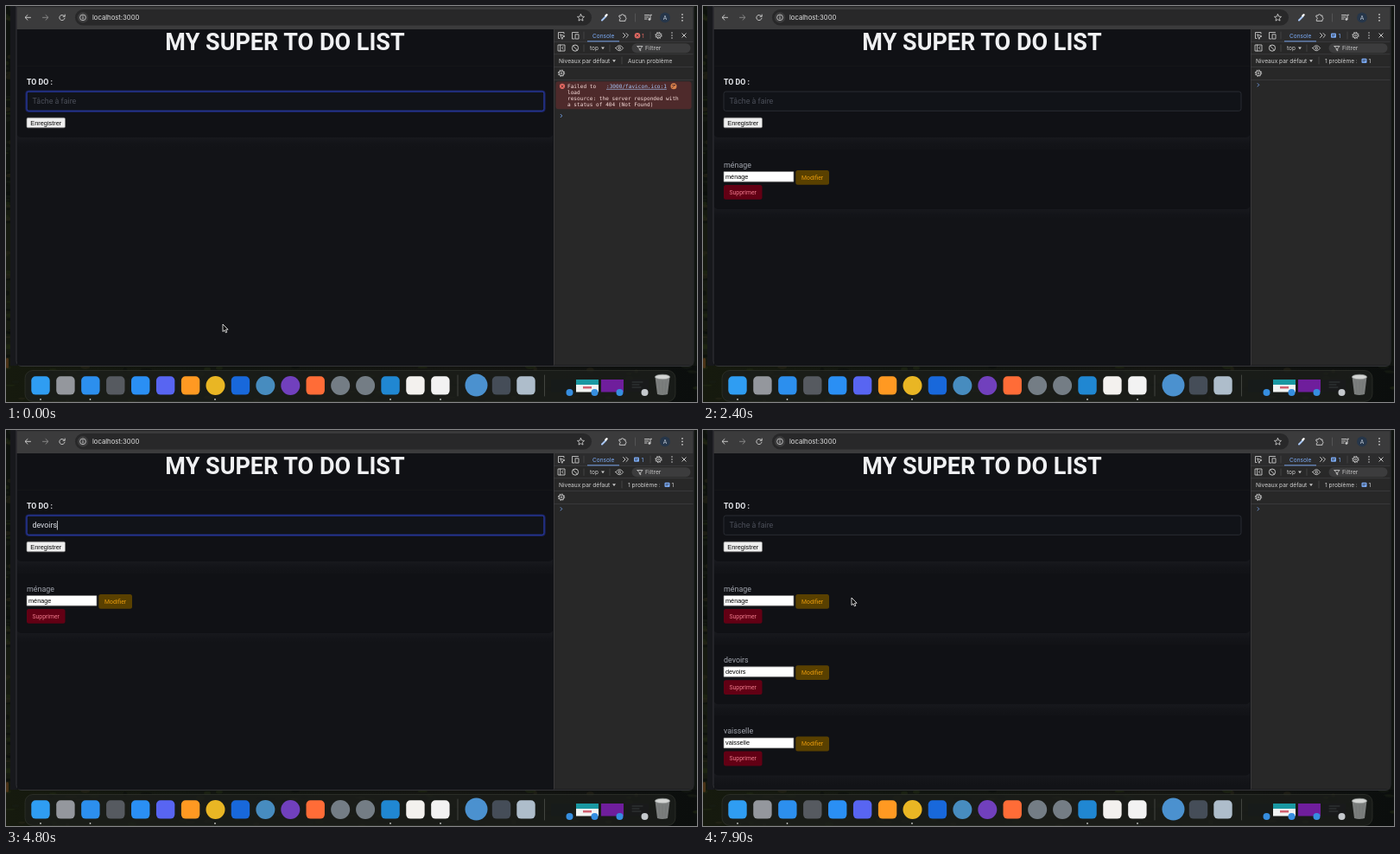
An HTML page that plays this animation: 800x458 px, repeating every 8 s.

```html
<!DOCTYPE html>
<html lang="fr">
<head>
<meta charset="utf-8">
<title>To do list</title>
<style>
html, body { margin: 0; width: 100%; height: 100%; overflow: hidden; background: #0c100c; }
svg { display: block; width: 100vw; height: 100vh; }
text { white-space: pre; }
.ui { font-family: Inter, sans-serif; }
.page { font-family: Roboto, sans-serif; }
.form { font-family: "Liberation Sans", Arial, sans-serif; }
.mono { font-family: "DejaVu Sans Mono", monospace; }
</style>
</head>
<body>
<svg id="stage" viewBox="0 0 800 458" preserveAspectRatio="none">
<defs>
  <linearGradient id="floor" x2="1" y2="0">
    <stop offset="0" stop-color="#161a0e"/><stop offset=".3" stop-color="#10140f"/>
    <stop offset=".65" stop-color="#141511"/><stop offset="1" stop-color="#0b0e0d"/>
  </linearGradient>
  <linearGradient id="glow" x2="0" y2="1">
    <stop offset="0" stop-color="#1d1e23"/><stop offset="1" stop-color="#121317" stop-opacity="0"/>
  </linearGradient>
  <clipPath id="view"><rect x="13" y="27" width="621" height="388.5"/></clipPath>
</defs>
<g id="desk"></g><g id="browser"></g><g id="tools"></g>
<g id="page" clip-path="url(#view)"></g>
<g id="menu"></g><g id="dock"></g>
<path id="pointer" d="M0 0V8.6L2 6.8L3.4 9.8L4.8 9.2L3.5 6.2H6.1Z" fill="#000" stroke="#fff" stroke-width=".8"/>
</svg>
<script>
const LOOP = 8000;
const $ = id => document.getElementById(id);
const rect = (x, y, w, h, fill, r = 0, extra = '') =>
  `<rect x="${x}" y="${y}" width="${w}" height="${h}" rx="${r}" fill="${fill}" ${extra}/>`;
const disc = (x, y, r, fill, extra = '') => `<circle cx="${x}" cy="${y}" r="${r}" fill="${fill}" ${extra}/>`;
const line = (d, color = '#c7c7c7', w = 1) =>
  `<path d="${d}" fill="none" stroke="${color}" stroke-width="${w}" stroke-linecap="round" stroke-linejoin="round"/>`;
const text = (x, y, size, fill, str, cls = 'ui', extra = '') =>
  `<text x="${x}" y="${y}" font-size="${size}" fill="${fill}" class="${cls}" ${extra}>${str}</text>`;
const ring = (x, y, r, color = '#c7c7c7', w = 1) => disc(x, y, r, 'none', `stroke="${color}" stroke-width="${w}"`);
const gear = (x, y) => ring(x, y, 2.9) + ring(x, y, 1, '#c7c7c7', .8) +
  `<circle cx="${x}" cy="${y}" r="3.7" fill="none" stroke="#c7c7c7" stroke-width="1" stroke-dasharray="1.4 1.5"/>`;
const caretDown = (x, y) => `<path d="M${x} ${y}h4l-2 2.6z" fill="#c7c7c7"/>`;

function seeded(seed) {
  return () => (seed = seed * 16807 % 2147483647) / 2147483647;
}

function drawDesk() {
  const rnd = seeded(41);
  const leaf = (x, y) => {
    const tone = ['#1f2813', '#0a0d0b', '#262417', '#171d14'][Math.floor(rnd() * 4)];
    return `<ellipse cx="${x}" cy="${y}" rx="${2 + rnd() * 5}" ry="${1 + rnd() * 2}" fill="${tone}" fill-opacity=".6"/>`;
  };
  const leaves = (n, place) => Array.from({ length: n }, () => leaf(...place())).join('');
  $('desk').innerHTML = rect(0, 0, 800, 458, '#0c100d') + rect(0, 410, 800, 48, 'url(#floor)') +
    rect(0, 0, 5, 230, '#0e120d') + rect(0, 230, 5, 180, '#161a10') +
    leaves(60, () => [rnd() * 5, rnd() * 420]) + leaves(120, () => [rnd() * 800, 416 + rnd() * 42]) +
    rect(0, 407, 3, 12, '#4a3216', 1.5) + rect(5, 0, 8, 416, '#17181c') +
    rect(795, 0, 5, 416, '#101410');
}

function drawBrowser() {
  $('browser').innerHTML =
    rect(12, -10, 784, 426.5, '#121317', 6, 'stroke="#434448" stroke-width=".7"') +
    rect(12.5, 0, 783, 27, '#3b3b3c') + rect(12.5, 0, 783, 1.2, '#242426') +
    rect(80, 4, 598, 18.5, '#282829', 9.2) +
    line('M28.5 13.3H22.5M25 10.5L22 13.3L25 16.2') +
    line('M42.5 13.3H48.5M46 10.5L49 13.3L46 16.2', '#858585') +
    line('M67.6 11.8A3.1 3.1 0 1 0 68 14.2M68.2 10V12.2H66') +
    disc(89, 13.3, 6.2, '#3b3b3c') + ring(89, 13.3, 3.4, '#d5d5d5', .8) +
    line('M89 12.9V15M89 11.5V11.6', '#d5d5d5', .9) +
    text(100, 16.1, 7.7, '#e3e3e3', 'localhost:3000') +
    line('M665.5 9.4L666.7 12.1L669.5 12.4L667.4 14.3L668 17.1L665.5 15.6L663 17.1L663.6 14.3L661.5 12.4L664.3 12.1Z', '#c7c7c7', .9) +
    line('M690 16.5L694.5 12', '#a8c7fa', 2) + line('M694.3 11.3L695.6 10.2', '#fff', 2.3) +
    line('M710.3 11H712.2A1.4 1.4 0 0 1 715 11H717V13.1A1.4 1.4 0 0 1 717 15.8V17.3H710.3V15.6A1.4 1.4 0 0 0 710.3 12.9Z') +
    line('M728.5 9V18', '#5b5b5c', .8) +
    line('M739.5 10.5H745M739.5 12.8H744M739.5 15H742M746 15.3V10.3H747.5') + disc(744.9, 15.4, 1.4, '#c7c7c7') +
    disc(763, 13.4, 5.9, '#26364a') + text(763, 15.8, 6.5, '#cfd8e3', 'A', 'ui', 'text-anchor="middle"') +
    [9.8, 13.3, 16.8].map(y => disc(783, y, .9, '#d0d0d0')).join('');
}

function drawTools() {
  const edge = y => rect(634, y, 161.5, .6, '#434446');
  const message = ['Failed to', 'load', 'resource: the server responded with', 'a status of 404 (Not Found)'];
  const blueBadge = (x, y) => rect(x, y, 6, 5.2, '#7cacf8', 1) +
    line(`M${x + 1.5} ${y + 1.7}h3m-3 1.6h2`, '#282828', .7);
  $('tools').innerHTML =
    rect(634, 27, 161.5, 388.5, '#282828') + rect(634, 27, 161.5, 14, '#2c2c2d') +
    rect(633.6, 27, .8, 388.5, '#515254') + edge(41) + edge(55.5) + edge(70) + edge(85) +
    line('M646 32V30.5H639.5V37.5H641M642 33L647 35L644.8 35.8L644 38Z', '#c7c7c7', .9) +
    line('M658 38H655.5V30.5H662.5M659.5 32.8H663V38H659.5Z', '#c7c7c7', .9) +
    line('M669 30V38', '#505050', .7) +
    text(679, 36.5, 6.5, '#7cacf8', 'Console') + rect(673, 40.4, 37, .9, '#7cacf8') +
    line('M714.5 31.5L717 34L714.5 36.5M718 31.5L720.5 34L718 36.5') +
    gear(755.5, 34) + [31, 34, 37].map(y => disc(771, y, .8, '#c7c7c7')).join('') +
    line('M782.8 31.8L787.2 36.2M787.2 31.8L782.8 36.2') + line('M746 30V38', '#505050', .7) +
    line('M639.5 45H647V52H639.5ZM641.7 45V52M645 47.2L643.5 48.5L645 49.8', '#c7c7c7', .9) +
    ring(659, 48.6, 3.6) + line('M656.6 46.2L661.4 51') + line('M669 45V52.5', '#505050', .7) +
    text(676, 51, 6.5, '#d0d0d0', 'top') + caretDown(689, 47.6) + line('M699 45V52.5', '#505050', .7) +
    line('M705.8 48.7Q710.2 42.4 714.6 48.7Q710.2 55 705.8 48.7Z', '#c7c7c7', .9) + ring(710.2, 48.7, 1.3) +
    rect(724.5, 43.2, 68, 11, '#3c3c3d', 5.5) +
    line('M731 46.5H737L734.7 49.2V51.8L733.3 50.8V49.2Z', '#c7c7c7', .9) +
    text(740, 51.1, 6.7, '#c7c7c7', 'Filtrer') +
    text(640, 65.7, 6.6, '#d0d0d0', 'Niveaux par défaut') + caretDown(702, 62.3) +
    line('M713 59V67', '#505050', .7) + gear(643, 77.7) +
    `<g id="failure">` +
      disc(731, 34.2, 3.3, '#e46962') + line('M729.8 33L732.2 35.4M732.2 33L729.8 35.4', '#303031', .8) +
      text(736, 36.6, 6.6, '#e46962', '1') + text(720, 65.7, 6.6, '#d0d0d0', 'Aucun problème') +
      rect(636.5, 87.3, 157, 32, '#4e2a2b', 3) +
      disc(644, 92.8, 3.1, '#e46962') + line('M642.9 91.7L645.1 93.9M645.1 91.7L642.9 93.9', '#4e2a2b', .8) +
      message.map((m, i) => text(650, 94.9 + i * 7.15, 6.12, '#f9dedc', m, 'mono')).join('') +
      text(695, 94.9, 6.12, '#a8c7fa', ':3000/favicon.ico:1', 'mono', 'text-decoration="underline"') +
      disc(773, 92.8, 3.5, '#d9824b') + line('M771 94.6L775 91M771.5 91.5H774.5', '#4e2a2b', .8) +
    `</g><g id="issue">` +
      blueBadge(727, 31.6) + text(735.5, 36.6, 6.6, '#7cacf8', '1') +
      text(720, 65.7, 6.6, '#d0d0d0', '1 problème :') + blueBadge(762.5, 60.8) +
      text(770.5, 65.7, 6.6, '#d0d0d0', '1') +
    `</g><path id="prompt" d="M641.8 -2L643.8 0L641.8 2" fill="none" stroke="#6b91cf"/>`;
}

function todo(name, i) {
  return `<g id="todo${i}" transform="translate(0 ${i * 82.3})">` +
    rect(13, 230, 620, 18, 'url(#glow)', 5) +
    `<path d="M13 166H633V230Q633 235 628 235H18Q13 235 13 230Z" fill="#101115"/>` +
    text(24, 186.6, 8.9, '#a0a4ad', name, 'page') +
    rect(24, 191.5, 81, 11.8, '#fff', .5, 'stroke="#777" stroke-width=".7"') +
    text(26, 199.9, 7.3, '#000', name, 'form') +
    rect(107.3, 190, 38.7, 16.8, '#594000', 2.5) + text(126.6, 200.8, 6.8, '#eb9c0c', 'Modifier', 'page', 'text-anchor="middle"') +
    rect(24, 207, 44.5, 16.8, '#620014', 2.5) + text(46.2, 217.6, 6.8, '#f17b8d', 'Supprimer', 'page', 'text-anchor="middle"') +
    `</g>`;
}

function drawPage() {
  $('page').innerHTML =
    rect(13, 27, 621, 389, '#121317') + rect(13, 147, 620, 19, 'url(#glow)', 5) +
    `<path d="M13 27H633V147Q633 152 628 152H18Q13 152 13 147Z" fill="#101115"/>` +
    rect(13, 69, 620, .7, '#16171b') +
    text(323, 50.7, 27, '#f0f1f3', 'MY SUPER TO DO LIST', 'page', 'text-anchor="middle" font-weight="700"') +
    text(24, 90.8, 8.8, '#e6e8ec', 'TO DO :', 'page', 'font-weight="700"') +
    rect(24, 99, 599, 22.3, '#111318', 2.5, 'id="field" stroke-width=".8"') +
    `<g id="focus" fill="none"><rect x="23.5" y="98.5" width="600" height="23.3" rx="3" stroke="#1b2463" stroke-width="2.2"/>` +
    `<rect x="24" y="99" width="599" height="22.3" rx="2.5" stroke="#293a9e" stroke-width=".9"/></g>` +
    text(30.5, 113.2, 8.9, '#4b4f59', 'Tâche à faire', 'page', 'id="hint"') +
    text(30.5, 113.2, 8.8, '#dfe3eb', '', 'page', 'id="typed"') +
    rect(0, 105, .8, 10.5, '#e4e6ea', 0, 'id="caret"') +
    rect(24, 129.3, 44.5, 11.5, '#efefef', 1.5, 'stroke="#858585" stroke-width=".7"') +
    text(46.3, 137.6, 7.35, '#000', 'Enregistrer', 'form', 'text-anchor="middle"') +
    saves.map((s, i) => todo(s.name, i)).join('');
  $('menu').innerHTML = rect(79, 125.5, 86, 105, '#1d1d1d', 2.5, 'stroke="#292929" stroke-width=".5"') +
    ['dormir', 'rage', 'zefczefz', 'ménage', 'devoirs']
      .map((s, i) => text(85.5, 141.2 + 20 * i, 7.1, '#e6e6e6', s, 'ui', 'font-weight="500"')).join('');
}

function drawDock() {
  const colors = ['#2f9df2', '#94979d', '#2c8fee', '#565a60', '#2a8ff4', '#5865f2', '#ff9922', '@#e9b624', '#1868db',
    '@#478cbf', '@#7140bd', '#ff6c37', '@#747d85', '@#747d85', '#2087d2', '#f3f1ee', '#f2f2f2'];
  const icon = (x, color) => color[0] === '@' ? disc(x, 439, 11, color.slice(1)) : rect(x - 10.7, 428.2, 21.4, 21.4, color, 5);
  const thumb = (x, color) => rect(x - 13, 432, 26, 14.5, color) + disc(x + 8.5, 447, 4, x > 720 ? '#c4c8cc' : '#368ee0');
  $('dock').innerHTML =
    rect(22, 421.5, 753, 36, '#1c1e1b', 9, 'fill-opacity=".8" stroke="#363933" stroke-width=".6"') +
    colors.map((c, i) => icon(40 + i * 28.93, c)).join('') +
    line('M523 427V451M623.5 427V451', '#4d504b', .8) +
    disc(544.5, 438.5, 13, '#4b91cf') + icon(573.5, '#454d58') + icon(602, '#aebdcb') +
    thumb(644, '#171b1a') +
    thumb(673, '#f1f3f2') + rect(660, 432, 26, 6, '#1a98a2') + rect(668, 440, 10, 2.5, '#d26070') +
    thumb(702, '#6f1e9c') + thumb(731, '#191a1b') +
    line('M725 435H737M725 438H733M725 441H735', '#44484a', .7) +
    `<path d="M751.5 429H768.5L766 449Q760 451 754 449Z" fill="#9ca09f" fill-opacity=".75"/>` +
    `<ellipse cx="760" cy="429" rx="8.6" ry="2.8" fill="#d3d5d3" stroke="#8a8e8d" stroke-width=".7"/>` +
    line('M756 434L757 447M760 434V447M764 434L763 447', '#737877', .7) +
    [40, 97.5, 242, 445, 503].map(x => disc(x, 455, .9, '#c5c7c3')).join('');
}

// Each entry: word, key press times, moment the list gains it.
const saves = [
  { name: 'ménage', keys: [1150, 1350, 1500, 1650, 1850, 2000], done: 2400 },
  { name: 'devoirs', keys: [3900, 4050, 4200, 4350, 4450, 4600, 4750], done: 5050 },
  { name: 'vaisselle', keys: [6200, 6350, 6500, 6600, 6700, 6850, 6980, 7100, 7250], done: 7450 }
];
const focusSpans = [[0, 2400], [3300, 5050], [5600, 7450]];
const pointerSpans = [[0, 1150], [2600, 3900], [5200, 6200], [7500, LOOP]];
const moves = [
  { at: 2600, end: 3150, from: [251, 368], to: [49, 109] },
  { at: 5200, end: 5550, from: [49, 109], to: [62, 106] },
  { at: 7500, end: 7850, from: [62, 106], to: [172, 194] }
];
const within = (spans, t) => spans.some(([a, b]) => t >= a && t < b);
const show = (id, on) => $(id).setAttribute('visibility', on ? 'visible' : 'hidden');

function pointerAt(t) {
  const m = moves.filter(m => t >= m.at).pop();
  if (!m) return moves[0].from;
  const p = Math.min(1, (t - m.at) / (m.end - m.at)), ease = p * p * (3 - 2 * p);
  return m.from.map((v, i) => v + (m.to[i] - v) * ease);
}

function render(t) {
  const entry = saves.find(s => t >= s.keys[0] && t < s.done);
  const word = entry ? entry.name.slice(0, entry.keys.filter(k => t >= k).length) : '';
  const failed = t < saves[0].done;
  $('typed').textContent = word;
  show('hint', !word);
  show('caret', !!word);
  if (word) $('caret').setAttribute('x', 30.5 + $('typed').getComputedTextLength());
  const focused = within(focusSpans, t);
  show('focus', focused);
  $('field').setAttribute('stroke', focused ? '#293a9e' : '#30333a');
  saves.forEach((s, i) => show('todo' + i, t >= s.done));
  show('failure', failed);
  show('issue', !failed);
  $('prompt').setAttribute('transform', `translate(0 ${failed ? 127 : 91.3})`);
  show('menu', t >= 5700 && t < 6200);
  show('pointer', within(pointerSpans, t));
  $('pointer').setAttribute('transform', `translate(${pointerAt(t)})`);
}

drawDesk(); drawBrowser(); drawTools(); drawPage(); drawDock();
const start = performance.now();
function tick() {
  render((performance.now() - start) % LOOP);
  requestAnimationFrame(tick);
}
tick();
</script>
</body>
</html>
```
